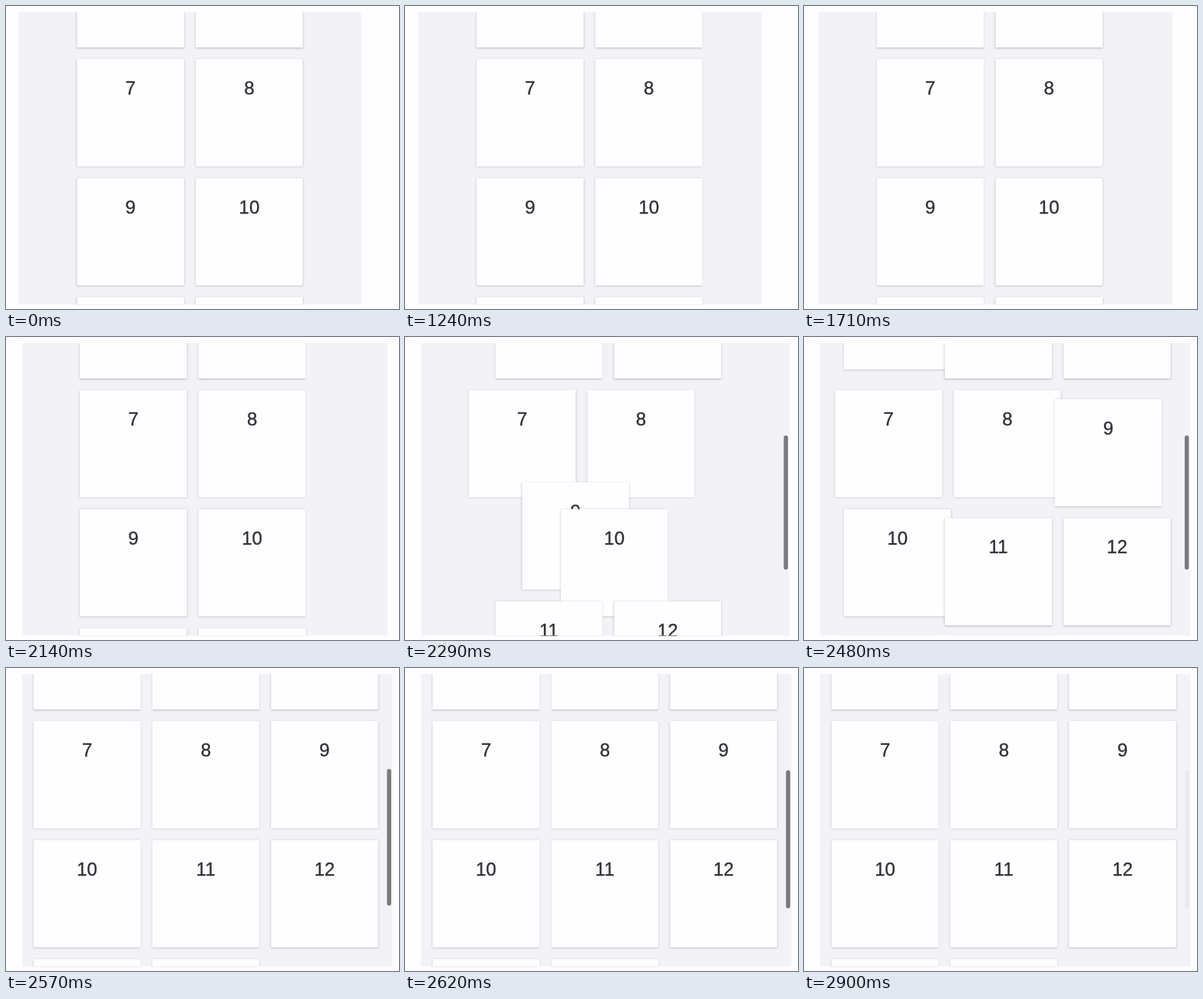
An HTML page with a canvas that plays this animation: 512 px wide and 394 px high, repeating every 3290 ms.

```html
<!DOCTYPE html>
<html lang="en">
<head>
<meta charset="utf-8">
<title>Reflowing card grid</title>
<style>
  html, body { margin: 0; height: 100%; overflow: hidden; background: #fefdff; }
  canvas { display: block; }
</style>
</head>
<body>
<canvas id="stage" width="512" height="394"></canvas>
<script>
const ctx = document.getElementById('stage').getContext('2d');
const LOOP = 3290;
const SIZE = 139.6, PITCH = 154.7, ROW0 = -240.4;
const TOP = 8, BOTTOM = 388.5;
const PAPER = '#fefdff', INK = '#323035';

// The picture holds between these moments.
const HOLDS = [0, 1240, 1380, 1710, 1950, 2140, 2290, 2380, 2480, 2570, 2620, 2760, 2810, 2855, 2900];

const mix = (a, b, p) => a + (b - a) * p;
const ramp = (t, from, to) => Math.min(1, Math.max(0, (t - from) / (to - from)));

// Ease in and out, like cubic-bezier(.42, 0, .58, 1).
function ease(x) {
  let lo = 0, hi = 1;
  for (let i = 0; i < 20; i++) {
    const u = (lo + hi) / 2, v = 1 - u;
    if (1.26 * v * v * u + 1.74 * v * u * u + u * u * u < x) lo = u; else hi = u;
  }
  return lo * lo * (3 - 2 * lo);
}

// Place of card i when the grid has this many columns.
function cell(i, cols, left, firstRow) {
  return [left + (i % cols) * PITCH, ROW0 + (Math.floor(i / cols) - firstRow) * PITCH];
}

function card(n, x, y) {
  ctx.save();
  ctx.shadowColor = 'rgba(0, 0, 0, 0.24)';
  ctx.shadowBlur = 2.5;
  ctx.shadowOffsetY = 0.7;
  ctx.fillStyle = PAPER;
  ctx.fillRect(x, y, SIZE, SIZE);
  ctx.restore();
  ctx.fillStyle = ctx.strokeStyle = INK;
  ctx.fillText(n, x + SIZE / 2, y + 46);
  ctx.strokeText(n, x + SIZE / 2, y + 46);
}

function scrollThumb(t, right) {
  const p = ramp(t, 2480, 2620);
  ctx.fillStyle = `rgba(0, 0, 0, ${mix(0.5, 0.045, ramp(t, 2700, 2900))})`;
  ctx.beginPath();
  ctx.roundRect(right - 7.3, mix(128, 133, p), 5.4, mix(174.5, 179.5, p), 2.7);
  ctx.fill();
}

function draw(t) {
  const drift = ramp(t, 1020, 2290);
  const left = mix(16.3, 21, drift);
  const right = mix(462.7, 503.7, ease(ramp(t, 950, 2600)));
  const gridLeft = mix(92.4, 96.6, drift);
  const reflow = ease(ramp(t, 2160, 2556));

  ctx.fillStyle = PAPER;
  ctx.fillRect(0, 0, 512, 394);

  ctx.save();
  ctx.beginPath();
  ctx.rect(left, TOP, right - left, BOTTOM - TOP);
  ctx.clip();
  ctx.fillStyle = '#f3f2f7';
  ctx.fillRect(left, TOP, right - left, BOTTOM - TOP);

  ctx.font = '24px "Liberation Sans", Helvetica, Arial, sans-serif';
  ctx.textAlign = 'center';
  ctx.lineWidth = 0.35;
  for (let i = 2; i < 14; i++) {
    const [x0, y0] = cell(i, 2, gridLeft, 1);
    const [x1, y1] = cell(i, 3, 35.8, 0);
    card(i + 1, mix(x0, x1, reflow), mix(y0, y1, reflow));
  }
  if (t >= 2290) scrollThumb(t, right);
  ctx.restore();
}

const start = performance.now();
function frame() {
  const t = (performance.now() - start) % LOOP;
  draw(HOLDS.findLast(hold => hold <= t));
  requestAnimationFrame(frame);
}
frame();
</script>
</body>
</html>
```
